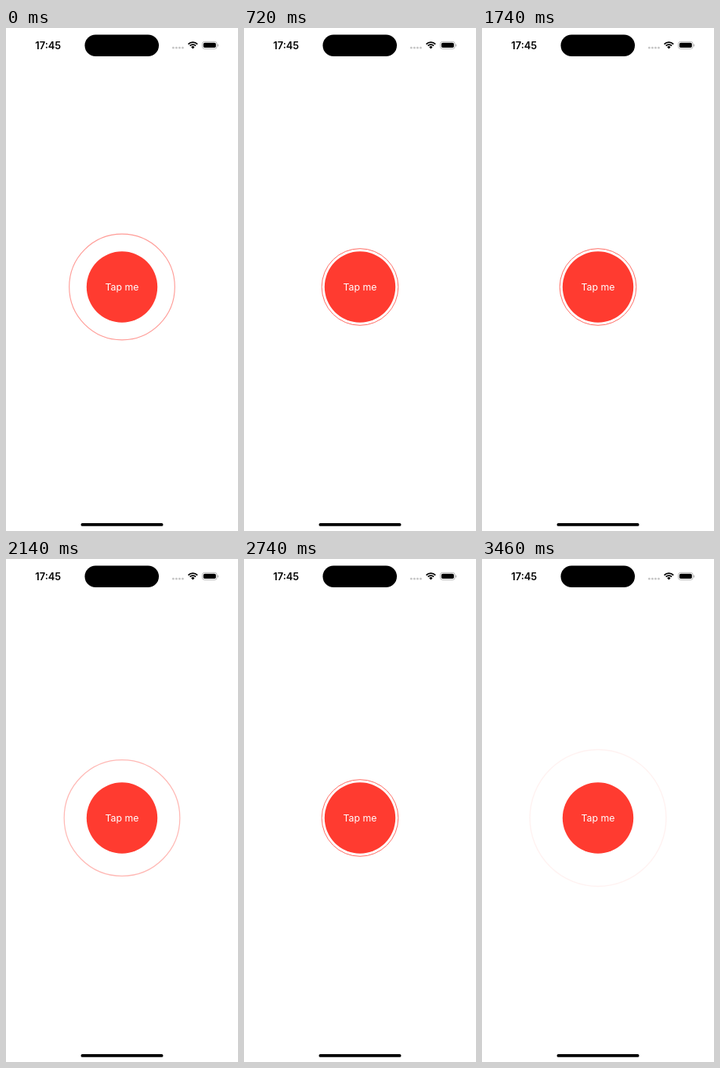
Recreate the animation shown at these times as an HTML page with a canvas. Size 296 px wide and 640 px high, loop 3560 ms.

```html
<!DOCTYPE html>
<html lang="en">
<head>
<meta charset="utf-8">
<title>Pulse button</title>
<style>
  html, body { margin: 0; width: 100%; height: 100%; overflow: hidden; background: #fff; }
  canvas { display: block; width: 296px; height: 640px; }
</style>
</head>
<body>
<canvas id="stage"></canvas>
<script>
const WIDTH = 296, HEIGHT = 640, LOOP = 3560;
const CX = 148, CY = 329.5, BUTTON_R = 45.2;
const RED = '#ff3b30';
const PULSE_STARTS = [-280, 730, 1740, 2740];
const PULSE_LIFE = 765;
const LONG_STEPS = [0, 6, 8, 10, 27, 30];

const canvas = document.getElementById('stage');
const ctx = canvas.getContext('2d');
const ratio = window.devicePixelRatio || 1;
canvas.width = WIDTH * ratio;
canvas.height = HEIGHT * ratio;
ctx.scale(ratio, ratio);

// The picture advances in 100 ms steps, a few of them 110 ms.
const stepTimes = [];
for (let i = 0, time = 0; time < LOOP; i++) {
  stepTimes.push(time);
  time += LONG_STEPS.includes(i) ? 110 : 100;
}

function disc(x, y, r, color) {
  ctx.fillStyle = color;
  ctx.beginPath();
  ctx.arc(x, y, r, 0, Math.PI * 2);
  ctx.fill();
}

function pill(x, y, w, h, r, color) {
  ctx.fillStyle = color;
  ctx.beginPath();
  ctx.roundRect(x, y, w, h, r);
  ctx.fill();
}

function label(text, x, baseline, font, color) {
  ctx.font = font + ' Inter, sans-serif';
  ctx.fillStyle = color;
  ctx.textAlign = 'center';
  ctx.fillText(text, x, baseline);
}

function drawWifi(x, y) {
  const from = -Math.PI * 0.75, to = -Math.PI * 0.25;
  ctx.strokeStyle = '#000';
  ctx.lineWidth = 1.8;
  for (const r of [8.3, 5.3]) {
    ctx.beginPath();
    ctx.arc(x, y, r, from, to);
    ctx.stroke();
  }
  ctx.fillStyle = '#000';
  ctx.beginPath();
  ctx.moveTo(x, y);
  ctx.arc(x, y, 3.1, from, to);
  ctx.fill();
}

function drawBattery() {
  ctx.strokeStyle = '#a8a8a8';
  ctx.lineWidth = 0.8;
  ctx.beginPath();
  ctx.roundRect(250.4, 17.3, 18.8, 9.2, 3);
  ctx.stroke();
  pill(251.8, 18.7, 16, 6.4, 1.8, '#000');
  pill(270.1, 20.4, 1, 3, 0.5, '#a8a8a8');
}

function drawChrome() {
  label('17:45', 53.7, 26.6, '600 12.8px', '#000');
  pill(100.5, 8.5, 94.5, 27.6, 13.8, '#000');
  for (let i = 0; i < 4; i++) disc(213.4 + i * 4, 25.2, 1.4, '#c6c6c6');
  drawWifi(238.4, 26.4);
  drawBattery();
  pill(95.5, 630, 105, 3.8, 1.9, '#000');
}

function drawPulse(time) {
  const start = PULSE_STARTS.findLast(s => time >= s - 10);
  const age = Math.max(0, time - start);
  if (age > PULSE_LIFE) return;
  const s = age / 1000;
  const r = 48.8 + 74.5 * s - 29.9 * s * s;
  ctx.globalAlpha = Math.max(0, 2 - r / 45);
  ctx.strokeStyle = RED;
  ctx.lineWidth = 0.75 * r / 45;
  ctx.beginPath();
  ctx.arc(CX, CY, r, 0, Math.PI * 2);
  ctx.stroke();
  ctx.globalAlpha = 1;
}

function draw(now) {
  const time = now % LOOP;
  ctx.fillStyle = '#fff';
  ctx.fillRect(0, 0, WIDTH, HEIGHT);
  drawChrome();
  drawPulse(stepTimes.findLast(t => t <= time));
  disc(CX, CY, BUTTON_R, RED);
  label('Tap me', CX, 334, '400 12.3px', '#fff');
}

let origin;
function tick(now) {
  origin ??= now;
  draw(Math.max(0, now - origin));
  requestAnimationFrame(tick);
}
draw(0);
requestAnimationFrame(tick);
</script>
</body>
</html>
```
